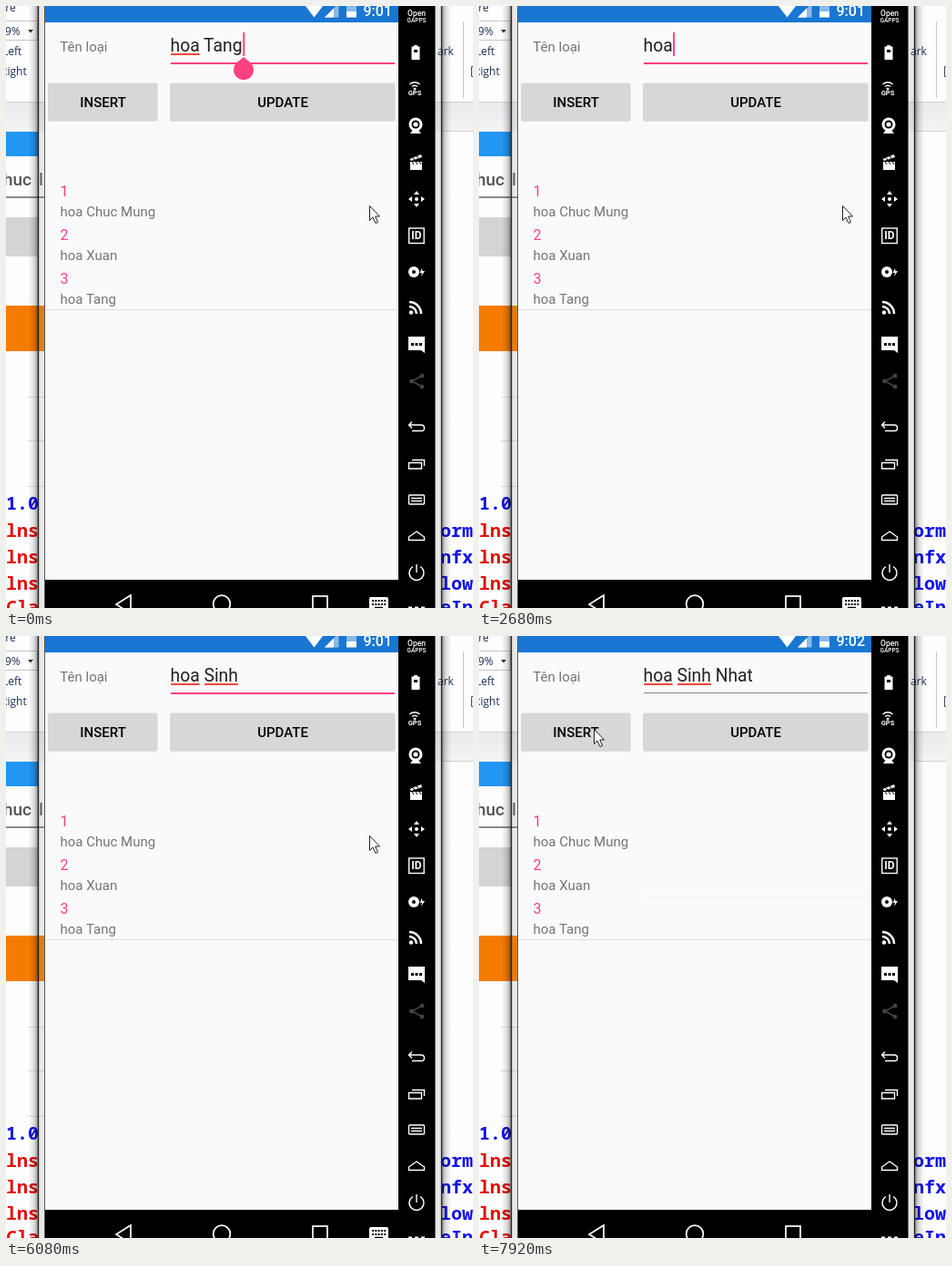
An HTML page for the animation above (8 s loop, 513x661 px).

```html
<!DOCTYPE html>
<html lang="vi">
<head>
<meta charset="utf-8">
<style>
html, body { margin: 0; width: 100%; height: 100%; overflow: hidden; background: #fff; }
svg { display: block; width: 513px; height: 661px; }
text { white-space: pre; }
.app { font-family: Roboto, sans-serif; }
.desk { font: 12px "Open Sans", sans-serif; fill: #1e2f57; }
.code { font: 600 20px "Noto Sans Mono", monospace; }
.line { fill: none; stroke: #fff; stroke-width: 1.4; }
</style>
</head>
<body>
<svg viewBox="0 0 513 661">
  <defs>
    <linearGradient id="shadeL"><stop offset="0" stop-opacity="0"/><stop offset=".6" stop-opacity=".14"/><stop offset="1" stop-opacity=".4"/></linearGradient>
    <linearGradient id="shadeR"><stop offset="0" stop-opacity=".4"/><stop offset=".4" stop-opacity=".14"/><stop offset="1" stop-opacity="0"/></linearGradient>
    <linearGradient id="band" x2="0" y2="1"><stop offset="0" stop-color="#e9eaec"/><stop offset="1" stop-color="#f4f4f5"/></linearGradient>
    <filter id="soft" x="-5%" y="-5%" width="110%" height="110%"><feGaussianBlur stdDeviation=".7"/></filter>
  </defs>

  <!-- desktop behind the emulator -->
  <rect width="513" height="661" fill="#fdfdfd"/>
  <rect y="105" width="513" height="33" fill="url(#band)"/>
  <path d="M0 105.500H513M478 137.500H513" stroke="#cfd2d6"/>
  <path d="M0 16.500H34.500V37.500H0M502.500 17V101" fill="none" stroke="#c3c6ca"/>
  <path d="M24 26h6l-3 3.500z" fill="#333"/>
  <g class="desk">
    <text x="-8" y="6">ure</text><text x="-1" y="32">9%</text>
    <text x="-4" y="54">Left</text><text x="-6" y="76">Right</text>
    <text x="474" y="54">ark</text>
  </g>
  <path d="M513 66.500H511.500V77.500H513" fill="none" stroke="#445"/>
  <g filter="url(#soft)">
    <path d="M-5 138H36V165H-5z" fill="#2196f3"/>
    <text class="app" x="-3" y="197" font-size="19" font-weight="500" fill="#555">huc</text>
    <path d="M38.500 183V197" stroke="#555" stroke-width="2"/>
    <path d="M-5 209H43V211H-5z" fill="#8b8b8b"/>
    <path d="M-5 232H36V275H-5z" fill="#d3d4d4"/>
    <path d="M-5 329H43V379H-5z" fill="#f57c00"/>
    <path d="M24 429.500H43M24 477.500H43M24 527.500H43" stroke="#dedede"/>
    <g class="code" fill="#e3100b">
      <text x="0" y="583">lns</text><text x="0" y="612">lns</text><text x="0" y="641">lns</text><text x="0" y="667">Cla</text>
    </g>
    <g class="code" fill="#1414e6">
      <text x="0" y="553">1.0</text><text x="477" y="583">orm</text><text x="477" y="612">nfx</text><text x="477" y="641">low</text><text x="477" y="667">eIn</text>
    </g>
  </g>

  <!-- emulator window -->
  <rect x="25" width="10" height="661" fill="url(#shadeL)"/>
  <rect x="479" width="10" height="661" fill="url(#shadeR)"/>
  <path d="M36 0H43V661H36zM471 0H478V661H471z" fill="#888" fill-opacity=".18"/>
  <path d="M35.500 0V661M478.500 0V661" stroke="#222" stroke-width="1.400"/>
  <path d="M42.500 0V661" stroke="#555"/>
  <rect x="43" width="388" height="661" fill="#fafafa"/>
  <rect x="43" width="388" height="18" fill="#1976d2"/>
  <path d="M43 630H431V661H43zM431 0H471.500V661H431z"/>
  <path d="M329 0H348L338.500 12.500z" fill="#fff"/>
  <path d="M350 12.500L365.500-3V12.500z" fill="#8abaea"/><path d="M350 12.500L360 2.500V12.500z" fill="#fff"/>
  <path d="M374 0H385V6H374z" fill="#8abaea"/><path d="M374 6H385V12.500H374z" fill="#fff"/>
  <text id="clock" class="app" x="392.500" y="11" font-size="16" font-weight="500" fill="#fff"></text>

  <g class="app">
    <text x="59.300" y="50" font-size="15" fill="#757575">Tên loại</text>
    <g id="buttons"></g>
    <g id="list"></g>
    <path d="M43 333.500H431" stroke="#dedede"/>
    <path id="divider" d="M181 285.500H427" stroke="#f0f0f0"/>
    <rect id="rule" x="181" y="62" width="246"/>
    <text id="field" x="180.600" y="50" font-size="19.300" fill="#212121"></text>
  </g>
  <path id="spelling" stroke="#f0483e" stroke-width="2"/>
  <rect id="caret" y="29" width="2" height="26" fill="#ff4081"/>
  <path id="handle" d="M261 56L269 62.500A11 11 0 1 1 253 62.500z" fill="#ff4081"/>

  <g class="line" style="stroke-width:1.700">
    <path d="M137 647L121 657L137 667z"/><circle cx="237" cy="656.500" r="9.300"/><rect x="337" y="648" width="16" height="17"/>
  </g>
  <g id="keyboard">
    <rect x="399" y="649" width="21" height="14" rx="2" fill="#fff"/>
    <path d="M402 653H418M402 657H418" stroke="#000" stroke-width="2" stroke-dasharray="2 1.300"/>
    <path d="M405 660.500H414" stroke="#000" stroke-width="1.500"/>
  </g>

  <!-- toolbar -->
  <g fill="#fff" text-anchor="middle" font-family="Roboto, sans-serif" font-weight="500">
    <text x="451" y="11" font-size="8.500">Open</text><text x="451" y="18" font-size="6.500">GAPPS</text>
    <path d="M448 43H452V44.500H454.500V59H445.500V44.500H448z"/><path d="M448 48H452V51H448z" fill="#000"/>
    <circle cx="449" cy="91" r="1.500"/>
    <path class="line" d="M446 88.500A4.500 4.500 0 0 1 452 88.500M443.500 86A8 8 0 0 1 454.500 86"/>
    <text x="449" y="98" font-size="7.500" font-weight="700">GPS</text>
    <circle cx="450" cy="130" r="7.500"/><circle cx="450" cy="130" r="4.500" fill="#000"/><circle cx="450" cy="130" r="2.600"/><path d="M447 136H453L456 140H444z"/>
    <path d="M444 171H457V180H444zM443.500 168L456 163L457 166L445 170z"/><path d="M446 171L448 174M450 171L452 174M454 171L456 174M447 167L449 169M451 165L453 167" stroke="#000"/>
    <circle cx="451" cy="212" r="2"/>
    <path d="M451 203L454 207H448zM451 221L454 217H448zM442 212L446 209V215zM460 212L456 209V215z"/>
    <rect class="line" x="442.700" y="244" width="16.500" height="16.500"/><text x="451" y="256" font-size="12" font-weight="700">ID</text>
    <circle cx="448" cy="292" r="6"/><circle cx="448" cy="292" r="2" fill="#000"/><path d="M457 288L454.500 293H457L456 297L460 291H457.500z"/>
    <circle cx="445" cy="336.500" r="2.200"/><path class="line" d="M443 330A8 8 0 0 1 451 338M443 325A13 13 0 0 1 456 338" style="stroke-width:2.500"/>
    <path d="M442 363H460V381L456 378H442z"/><path d="M445 370H448V373H445zM449.500 370H452.500V373H449.500zM454 370H457V373H454z" fill="#000"/>
    <g fill="#444" stroke="#444"><path d="M457 406L446 412L457 418" fill="none" stroke-width="1.500"/><circle cx="457" cy="406" r="2"/><circle cx="445.500" cy="412" r="2"/><circle cx="457" cy="418" r="2"/></g>
    <g class="line">
      <path d="M446 456.500L442.500 460L446 463.500M442.500 460H456Q459.500 460 459.500 463.500T456 466.500H446"/>
      <path d="M442.500 501.500H456.500V508H442.500zM446 498.500H459.500V505"/>
      <rect x="442.500" y="537" width="17" height="10" rx="1"/><path d="M445 540.500H457M445 543.500H457"/>
      <path d="M451 577L459.500 583V586.500H442.500V583z"/>
      <path d="M447 615.500A8 8 0 1 0 455 615.500M451 613V622"/>
    </g>
    <path d="M442 659.500H446V663H442zM449 659.500H453V663H449zM456 659.500H460V663H456z"/>
  </g>
  <path id="mouse" d="M.500.500V16.500L4 13L7 19.500L9.500 18.500L6.700 12H11.500z" fill="#fff" stroke="#222"/>
</svg>
<script>
const LOOP = 8000;
const $ = id => document.getElementById(id);
const show = (id, on) => $(id).setAttribute("visibility", on ? "visible" : "hidden");
const latest = (steps, t) => steps.filter(s => s[0] <= t).pop();

// [time, text, caret hidden]
const typing = [
  [0, "hoa Tang"], [640, "hoa Tan"], [770, "hoa Ta"], [900, "hoa T"], [1040, "hoa "],
  [1180, "hoa"], [1330, "ho"], [1470, "h"], [1620, ""], [2080, "", true],
  [2380, "h"], [2520, "ho"], [2660, "hoa"], [2810, "hoa "], [3370, "hoa ", true], [3770, "hoa "],
  [4330, "hoa S"], [4920, "hoa Si"], [5070, "hoa Sin"], [5220, "hoa Sinh"], [5360, "hoa Sinh "],
  [6080, "hoa Sinh ", true], [6220, "hoa Sinh N"], [6360, "hoa Sinh Nh"], [6500, "hoa Sinh Nha"],
  [6640, "hoa Sinh Nhat"], [7200, "hoa Sinh Nhat", true], [7630, "hoa Sinh Nhat"], [7920, "hoa Sinh Nhat", true]
];
// [time, share of the pointer's way]
const pointer = [[0, 0], [7340, .15], [7490, .5], [7630, .85], [7780, 1]];

$("buttons").innerHTML = [["INSERT", 46, 120.5], ["UPDATE", 180, 247.5]].map(([label, x, w]) => `
  <rect x="${x}" y="86" width="${w}" height="41" rx="2.500" fill="#c4c5c5" opacity=".5"/>
  <rect x="${x}" y="84.500" width="${w}" height="41.500" rx="2.500" fill="#d6d7d7"/>
  <text x="${x + w / 2 + .3}" y="111" font-size="15" font-weight="500" text-anchor="middle">${label}</text>`).join("");

$("list").innerHTML = ["hoa Chuc Mung", "hoa Xuan", "hoa Tang"].map((name, i) => `
  <text x="59.500" y="${209 + 48 * i}" font-size="16" fill="#ff4081">${i + 1}</text>
  <text x="59.500" y="${231 + 48 * i}" font-size="15" fill="#757575">${name}</text>`).join("");

const pen = document.createElement("canvas").getContext("2d");
function edge(text) {
  pen.font = "19.3px Roboto, sans-serif";
  return 180.6 + pen.measureText(text).width;
}
const mark = (before, word) => `M${edge(before) + .6} 53H${edge(before + word)}`;

function draw(t) {
  const [, text, caretHidden] = latest(typing, t);
  const clicked = t >= 7920;
  $("field").textContent = text;
  $("caret").setAttribute("x", edge(text) + .4);
  show("caret", !caretHidden);
  show("handle", t < 510);
  let marks = text.startsWith("hoa ") ? mark("", "hoa") : "";
  if (t >= 5510) marks += mark("hoa ", "Sinh");
  $("spelling").setAttribute("d", marks);

  $("clock").textContent = t < 6360 ? "9:01" : "9:02";
  $("rule").setAttribute("height", clicked ? 1 : 2);
  $("rule").setAttribute("fill", clicked ? "#858585" : "#ff4081");
  show("divider", clicked);
  show("keyboard", !clicked);

  const p = latest(pointer, t)[1];
  $("mouse").setAttribute("transform", `translate(${399 - 273 * p} ${219 - 117 * p})`);
}

const start = performance.now();
function tick() {
  draw((performance.now() - start) % LOOP);
  requestAnimationFrame(tick);
}
tick();
</script>
</body>
</html>
```
